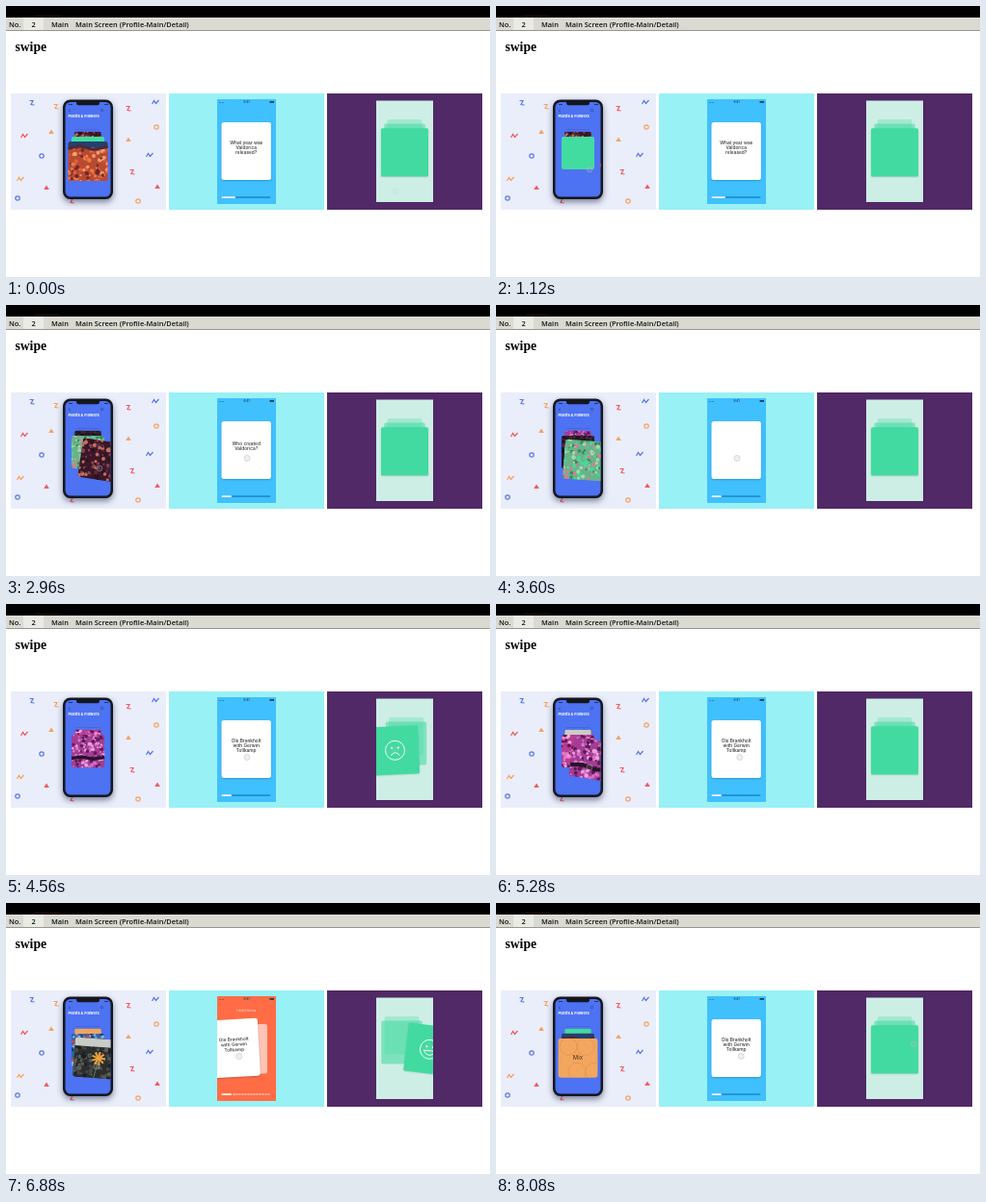
Animation, 502 px wide and 282 px high, one loop 8.16 s. Source, as an HTML page with a canvas:

```html
<!DOCTYPE html>
<html>
<head>
<meta charset="utf-8">
<style>
html, body { margin: 0; width: 100%; height: 100%; overflow: hidden; background: #fff; }
canvas { display: block; width: 502px; height: 282px; }
</style>
</head>
<body>
<canvas id="stage"></canvas>
<script>
const LOOP = 8160, STEP = 80;
const canvas = document.getElementById('stage');
const c = canvas.getContext('2d');
const ratio = window.devicePixelRatio || 1;
canvas.width = 502 * ratio;
canvas.height = 282 * ratio;
c.scale(ratio, ratio);

const UI = 'Inter, Roboto, sans-serif';
const clamp = v => Math.max(0, Math.min(1, v));
const lerp = (a, b, k) => a + (b - a) * k;

// Eased value at time t along [time, value] keys
function at(t, keys) {
  if (t <= keys[0][0]) return keys[0][1];
  for (let i = 1; i < keys.length; i++) {
    const [t0, a] = keys[i - 1], [t1, b] = keys[i];
    if (t < t1) {
      const k = (t - t0) / (t1 - t0);
      return lerp(a, b, k * k * (3 - 2 * k));
    }
  }
  return keys[keys.length - 1][1];
}

function rect(x, y, w, h, color) {
  c.fillStyle = color;
  c.fillRect(x, y, w, h);
}
function round(x, y, w, h, r, color) {
  c.beginPath();
  c.roundRect(x, y, w, h, r);
  c.fillStyle = color;
  c.fill();
}
function disc(x, y, r, color) {
  c.beginPath();
  c.arc(x, y, r, 0, 7);
  c.fillStyle = color;
  c.fill();
}
function line(points, color, width) {
  c.beginPath();
  points.forEach(([x, y]) => c.lineTo(x, y));
  c.strokeStyle = color;
  c.lineWidth = width;
  c.stroke();
}
function ring(x, y, r, color, width, from = 0, to = 7) {
  c.beginPath();
  c.arc(x, y, r, from, to);
  c.strokeStyle = color;
  c.lineWidth = width;
  c.stroke();
}
function text(s, x, y, font, color, align = 'left') {
  c.font = font;
  c.textAlign = align;
  c.fillStyle = color;
  c.fillText(s, x, y);
}
function scoped(draw) {
  c.save();
  draw();
  c.restore();
}
function clipTo(x, y, w, h, r = 0) {
  c.beginPath();
  c.roundRect(x, y, w, h, r);
  c.clip();
}
function shadow(color, blur, y) {
  c.shadowColor = color;
  c.shadowBlur = blur * ratio;
  c.shadowOffsetY = y * ratio;
}
function touch(x, y, alpha) {
  scoped(() => {
    c.globalAlpha = alpha;
    disc(x, y, 3, 'rgba(190,190,190,.3)');
    ring(x, y, 3, '#b9bdc0', .7);
  });
}

// Top card index, its sideways drag, and how far the stack still has to rise
function deck(t, leaves, keys) {
  let i = leaves.findIndex(l => t < l + 200);
  if (i < 0) i = leaves.length;
  return {
    i,
    x: i < leaves.length ? at(t - leaves[i], keys) : 0,
    rise: i ? 1 - at(t - leaves[i - 1], [[200, 0], [450, 1]]) : 0
  };
}

function header() {
  const font = '600 7.4px "Open Sans", "Noto Sans", sans-serif';
  rect(0, 0, 502, 282, '#fff');
  rect(0, 0, 502, 12, '#000');
  rect(30, 10, 25, .7, '#4a1010');
  rect(0, 12, 502, 14, '#dadad2');
  rect(18, 12, 21, 13, '#ebebe5');
  rect(0, 25, 502, 1, '#96968f');
  text('No.', 3, 22, font, '#111');
  text('2', 28.5, 22, font, '#111', 'center');
  text('Main', 47, 22, font, '#111');
  text('Main Screen (Profile-Main/Detail)', 72, 22, font, '#111');
  text('swipe', 9.5, 47, 'bold 13.6px "Liberation Serif", serif', '#000');
}

const RED = '#ee5a62', BLUE = '#5a78e6', ORANGE = '#f5a263';
const confetti = [
  ['z', 27, 101, BLUE], ['z', 52, 105, ORANGE], ['z', 127, 107, RED], ['w', 155, 100, BLUE],
  ['w', 19, 135, RED], ['t', 47, 131, ORANGE], ['t', 127, 139, ORANGE], ['o', 156, 126, ORANGE],
  ['o', 37, 156, BLUE], ['w', 149, 155, BLUE], ['w', 15, 180, ORANGE], ['t', 42, 189, RED],
  ['z', 131, 173, RED], ['t', 157, 188, RED], ['o', 12, 200, BLUE], ['o', 137, 203, ORANGE],
  ['z', 68, 203, RED]
];
function bit([kind, x, y, color]) {
  if (kind === 'o') ring(x, y, 2.2, color, 1.2);
  else if (kind === 'w') line([[x - 3.5, y + 2], [x - 1.5, y - 1.5], [x + .5, y + 1.5], [x + 3.5, y - 2]], color, 1.2);
  else if (kind === 'z') line([[x - 2.5, y - 2.5], [x + 1, y - 2.5], [x - 1, y + 1.5], [x + 2.5, y + 2]], color, 1.2);
  else {
    c.beginPath();
    c.moveTo(x, y - 2.6);
    c.lineTo(x + 2.8, y + 2);
    c.lineTo(x - 2.8, y + 2);
    c.fillStyle = color;
    c.fill();
  }
}

const photos = [
  ['#b94a30', '#ee7a43', '#e25c35', '#6b2a30', '#f3a06c'],
  ['#42dca0'],
  ['#3a1826', '#8e3d58', '#c0705f', '#5c2440', '#2a1220'],
  ['#67b48a', '#e07a92', '#48d79a', '#a5d7a8', '#3d8a5c'],
  ['#241722', '#4c2a3c', '#171119', '#3b2a38'],
  ['#a43c94', '#d76fc6', '#e9a0dc', '#5b1c56'],
  ['#b83c94', '#ea78ca', '#f4aadd', '#5f1a4e'],
  ['#2b2e2d', '#454846', '#1c1f1f', '#5a5d59'],
  ['#2f67ad', '#c9483c', '#80b2df', '#1f3560'],
  ['#f2a65e']
];
const photoLeaves = [1000, 2150, 3000, 3750, 4350, 5300, 6400, 7050, 7650];
const photoDrag = [[-500, 0], [-150, 6], [0, 14], [200, 70]];

// A 41-unit square around the current origin
function photo(n) {
  const [base, ...tones] = photos[n];
  clipTo(-20.5, -20.5, 41, 41, 2.5);
  rect(-21, -21, 42, 42, base);
  let seed = n * 977 + 13;
  const rnd = () => (seed = seed * 16807 % 2147483647) / 2147483647;
  for (let k = 0; k < 10; k++) rnd();
  if (tones.length) {
    for (let k = 0; k < 130; k++) {
      disc(rnd() * 42 - 21, rnd() * 42 - 21, .6 + rnd() * 1.8, tones[k % tones.length]);
    }
  }
  if (n === 0) {
    rect(-21, -21, 42, 7, '#24406f');
    line([[-21, -13], [-8, -16], [5, -12], [21, -15]], '#4a2a3c', 3);
  } else if (n === 5) {
    line([[-21, 9], [-8, 7], [6, 10], [21, 8]], '#26142a', 4);
  } else if (n === 7) {
    rect(-21, -21, 42, 9, '#c9cdc8');
    for (let a = 0; a < 6.2; a += .7) {
      line([[5, 0], [5 + 7 * Math.cos(a), 7 * Math.sin(a)]], '#f0a13c', 2);
    }
    line([[5, 2], [1, 21]], '#5e7a48', 1);
  } else if (n === 9) {
    for (let k = 0; k < 4; k++) ring(-10 + k * 9, k % 2 ? 14 : -12, 9, '#e0944f', .7);
    text('Mix', 0, 2, '500 6px ' + UI, '#6b4326', 'center');
  }
}

function phonePanel(t) {
  clipTo(5, 91, 161, 121);
  rect(5, 91, 161, 121, '#eaeefa');
  confetti.forEach(bit);
  scoped(() => {
    shadow('rgba(30,35,70,.55)', 6, 3);
    round(59, 97.5, 52, 103.5, 7.5, '#15171f');
  });
  scoped(() => {
    clipTo(61.5, 100, 47, 98.5, 5.5);
    rect(61, 99, 48, 100, '#4d72f2');
    round(73, 97, 24, 6.2, 2.5, '#15171f');
    rect(65, 102, 4, 1, '#24356f');
    rect(102, 102, 4, 1, '#24356f');
    line([[67, 107.5], [65, 109], [67, 110.5]], '#28418f', .6);
    ring(99.5, 108.5, 1.2, '#28418f', .6);
    text('Plants & Flowers', 64.5, 115.5, '700 4px ' + UI, '#fff');
    rect(73, 128, 24, .6, '#3f5fd0');

    const { i, x, rise } = deck(t, photoLeaves, photoDrag);
    for (let k = 2; k >= 0; k--) {
      const slot = k + rise, off = k ? 0 : x;
      scoped(() => {
        c.globalAlpha = clamp(3 - slot);
        c.translate(85 + off, 161.5 - 8.5 * slot);
        c.rotate(off * .012);
        const scale = (41 - 6.8 * slot) / 41;
        c.scale(scale, scale);
        photo((i + k) % photos.length);
      });
    }
    if (x > 3) touch(Math.min(97, 88 + x), 170, .5);
  });
}

const questions = [
  ['What year was', 'Valdorica', 'released?'],
  ['Who created', 'Valdorica?'],
  ['Ole Brankholt', 'with Gerwin', 'Tollkamp']
];
function quizPanel(t) {
  const x = at(t, [[6400, 0], [6800, -12], [7040, -14], [7600, 0]]);
  const warm = clamp(-x / 8);
  const first = t < 1600;
  const page = first ? 0 : t < 3600 ? 1 : 2;
  const ink = first ? 1 : at(t, [[1600, 0], [1840, 1], [3360, 1], [3600, 0], [3840, 1]]);

  rect(169, 91, 161, 121, '#98f1f5');
  clipTo(219, 97, 61, 109);
  rect(219, 97, 61, 109, '#40c0fd');
  c.globalAlpha = warm;
  rect(219, 97, 61, 109, '#ff6c46');
  text('I didn’t know', 249, 112.5, '500 3.4px ' + UI, '#ffd9cc', 'center');
  c.globalAlpha = 1;

  const tiny = '600 3px ' + UI;
  text('•••• ', 220.5, 101, tiny, '#17405c');
  text('9:41', 249.5, 101, tiny, '#17405c', 'center');
  rect(273.5, 99, 4.5, 1.8, '#17405c');

  scoped(() => {
    c.globalAlpha = 1 - warm;
    round(223.5, 198.2, 51, 1.8, .9, '#1f8fd0');
  });
  for (let k = 0; k < 13; k++) {
    c.globalAlpha = warm;
    rect(235.5 + k * 3, 198.2, 2, 1.8, '#ffc0ad');
  }
  c.globalAlpha = 1;
  round(223.5, 198.2, first ? 14.5 : 10.5, 1.8, .9, '#fff');

  round(227.5, 126, 43.5, 51.5, 2, 'rgba(255,255,255,.6)');
  scoped(() => {
    c.translate(249.2 + x, 151);
    c.rotate(x * .0042);
    scoped(() => {
      shadow('rgba(0,40,80,.25)', 2, 1);
      round(-25.7, -30, 51.4, 60, 2.5, '#fff');
    });
    c.globalAlpha = ink;
    const top = page === 1 ? -5 : -7.5;
    questions[page].forEach((s, k) => text(s, 0, top + k * 5.4, '500 4.8px ' + UI, '#333', 'center'));
  });
  const tx = at(t, [[4800, 250], [5600, 254.2]]) + x;
  if (t > 1840) touch(tx, 159.5, .75);
}

const moodLeaves = [2320, 4720, 6820];
const moodDirs = [1, -1, 1];
const moodDrag = [[-500, 0], [-150, 10], [0, 16], [200, 62]];

function face(x, y, happy) {
  ring(x, y, 10, '#fff', .9);
  disc(x - 3.4, y - 2.6, 1, '#fff');
  disc(x + 3.4, y - 2.6, 1, '#fff');
  if (happy) {
    ring(x, y, 6, '#fff', .9, .25, Math.PI - .25);
    line([[x - 5.8, y + 1.5], [x + 5.8, y + 1.5]], '#fff', .9);
  } else {
    ring(x, y + 7, 4.5, '#fff', .9, Math.PI + .35, -.35);
  }
}

function moodPanel(t) {
  rect(333, 91, 161, 121, '#502966');
  clipTo(384, 98.5, 59, 105.5);
  rect(384, 98, 59, 107, '#cdeee5');
  const { i, x, rise } = deck(t, moodLeaves, moodDrag);
  const off = x * (moodDirs[i] || 0);
  for (let k = 2; k >= 0; k--) {
    const slot = k + rise, w = 49 - 6.6 * slot, h = 50 - 5.2 * slot;
    scoped(() => {
      c.globalAlpha = at(slot, [[0, 1], [1, .56], [2, .3], [3, 0]]);
      c.translate(413.5 + (k ? Math.max(-3, Math.min(3, -off * .15)) : off), 127.3 - 4.7 * slot + h / 2);
      if (!k) {
        c.rotate(off * .0045);
        shadow('rgba(20,110,80,.3)', 1.5, .6);
      }
      round(-w / 2, -h / 2, w, h, 1.5, '#42daa0');
      if (!k && x > 0) {
        shadow('transparent', 0, 0);
        c.globalAlpha = clamp(x / 9);
        face(0, 0, off > 0);
      }
    });
  }
  if (t < 240) touch(404, 193, .25);
  if (x > 0 && x < 30) touch(413.5 + off, 152, .4);
  if (t > 7900) touch(433.5, 147, .6);
}

function frame(now) {
  const t = Math.floor(now % LOOP / STEP) * STEP;
  header();
  [phonePanel, quizPanel, moodPanel].forEach(panel => scoped(() => panel(t)));
  requestAnimationFrame(frame);
}
let start;
requestAnimationFrame(function begin(now) {
  start = performance.now();
  const tick = () => frame(performance.now());
  tick();
});
</script>
</body>
</html>
```
